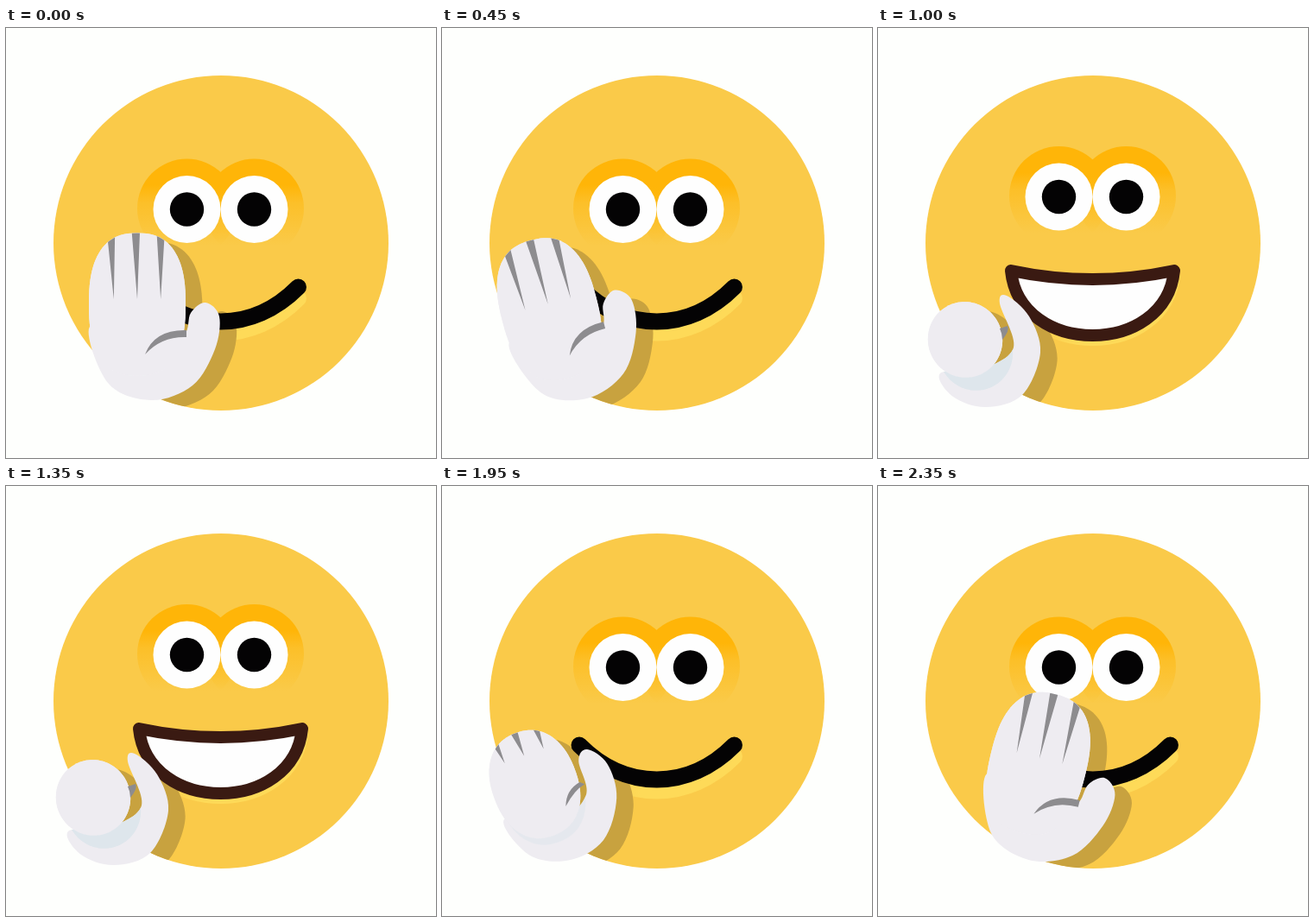
An HTML page with a canvas that plays this animation: 498x498 px, repeating every 2400 ms.

```html
<!DOCTYPE html>
<html lang="en">
<head>
<meta charset="utf-8">
<title>Giggling smiley</title>
<style>
  html, body { margin: 0; width: 100%; height: 100%; overflow: hidden; background: #fefffd; }
  canvas { display: block; width: 498px; height: 498px; }
</style>
</head>
<body>
<canvas id="stage" width="498" height="498"></canvas>
<script>
const ctx = document.getElementById('stage').getContext('2d');
const LOOP = 2400, STEP = 50;
const INK = '#040304', BROWN = '#3a1a12', WHITE = '#fefefe';
const GLOVE = '#eeecf1', CREASE = '#8d8c8f', FOLD = '#dee6ec', SHADOW = '#c8a23f';

// left x, right x, corner y, top middle, bottom middle, line width, end handle
const SMILE = [159, 338.5, 300, 340, 340, 19, 53];
const GRIN = [154, 344.5, 297, 332, 345, 14, 50];
const LAUGH = [154, 343, 281, 291, 356, 14, 10];

// Outline of palm and thumb, and the crease below the thumb: open hand, then fist.
const PALM = [
  [98, 345, 170, 378, 206, 356, 214, 330, 231, 318, 247, 334, 242, 372, 216, 414, 168, 431, 118, 411],
  [72, 400, 120, 395, 157, 370, 141, 319, 149, 310, 175, 334, 188, 376, 167, 425, 125, 439, 87, 427]
];
const THUMB = [
  [161, 378, 172, 349, 209, 350, 209, 358, 180, 357],
  [144, 361, 144, 354, 141, 348, 150, 345, 153, 350]
];

const lerp = (a, b, k) => a + (b - a) * k;
const mix = (a, b, k) => a.map((v, i) => lerp(v, b[i], k));

function ramp(t, from, to) {
  const x = Math.min(1, Math.max(0, (t - from) / (to - from)));
  return x * x * (3 - 2 * x);
}

// Turns a list of x, y pairs about the wrist.
function turn(pts, angle, shift) {
  const c = Math.cos(angle), s = Math.sin(angle);
  return pts.map((v, i) => {
    const x = pts[i - i % 2] - 160, y = pts[i - i % 2 + 1] - 430;
    return i % 2 ? 430 + x * s + y * c : 160 + shift + x * c - y * s;
  });
}

// Closed curve through all points.
function smooth(p) {
  const path = new Path2D(), n = p.length;
  const at = i => p[(i + n) % n];
  path.moveTo(p[0], p[1]);
  for (let i = 0; i < n; i += 2) {
    const out = d => at(i + d) + (at(i + 2 + d) - at(i - 2 + d)) / 6;
    const into = d => at(i + 2 + d) - (at(i + 4 + d) - at(i + d)) / 6;
    path.bezierCurveTo(out(0), out(1), into(0), into(1), at(i + 2), at(i + 3));
  }
  return path;
}

// Rounded block of radius 1; power 2 is a circle.
function block(power) {
  const path = new Path2D();
  const bend = v => Math.sign(v) * Math.abs(v) ** (2 / power);
  for (let i = 0; i < 96; i++) {
    const a = i / 48 * Math.PI;
    path.lineTo(bend(Math.cos(a)), bend(Math.sin(a)));
  }
  path.closePath();
  return path;
}

function fill(path, color) {
  ctx.fillStyle = color;
  ctx.fill(path);
}

function disc(x, y, r, color) {
  const path = new Path2D();
  path.arc(x, y, r, 0, Math.PI * 2);
  fill(path, color);
  return path;
}

function isolate(paint) {
  ctx.save();
  paint();
  ctx.restore();
}

function drawEyes() {
  const glow = ctx.createLinearGradient(0, 152, 0, 252);
  glow.addColorStop(0.3, '#ffb508');
  glow.addColorStop(0.5, 'rgba(255,181,8,.5)');
  glow.addColorStop(1, 'rgba(255,181,8,0)');
  const pair = (y, r, color) => [209.5, 287.5].forEach(x => disc(x, y, r, color));
  pair(209, 57.5, glow);
  pair(210, 39, WHITE);
  pair(210, 19.7, INK);
}

function drawMouth([left, right, y, top, bottom, width, handle], line, inside) {
  const path = new Path2D(), low = y + (bottom - y) * 4 / 3;
  path.moveTo(left, y);
  path.quadraticCurveTo((left + right) / 2, 2 * top - y, right, y);
  path.bezierCurveTo(right - handle, low, left + handle, low, left, y);
  path.closePath();
  // A bare line keeps its upper edge as the return of the lower one.
  const bare = top === bottom;
  const curve = bare ? new Path2D() : path;
  if (bare) {
    curve.moveTo(left, y);
    curve.bezierCurveTo(left + handle, low, right - handle, low, right, y);
  } else {
    fill(path, inside);
  }
  ctx.lineWidth = width;
  ctx.lineCap = ctx.lineJoin = 'round';
  ctx.strokeStyle = line;
  ctx.stroke(curve);
}

function drawMouthGlow(mouth, laugh) {
  const light = ctx.createLinearGradient(170, 0, 230, 0);
  light.addColorStop(0, 'rgba(254,218,88,0)');
  light.addColorStop(1, '#feda58');
  isolate(() => {
    ctx.translate(0, 13 - 8 * laugh);
    drawMouth(mouth, light, light);
  });
}

function poseHand(t) {
  const degrees = -22 * ramp(t, 50, 700) + 37 * ramp(t, 1900, 2320) - 15 * ramp(t, 2340, 2400);
  const curl = ramp(t, 500, 1000) - ramp(t, 1700, 2200);
  const angle = degrees * Math.PI / 180, shift = 0.5 * Math.max(0, degrees);
  const bend = ([open, fist]) => mix(turn(open, angle, shift), fist, curl);
  return {
    curl, angle,
    palm: smooth(bend(PALM)),
    thumb: bend(THUMB),
    center: bend([[152, 320], [101, 361]]),
    size: mix([56, 82.5], [43, 44], curl),
    fingers: block(lerp(2.5, 2, curl))
  };
}

// Paints in units of the finger block.
function inFingers({ center, size, angle }, paint) {
  isolate(() => {
    ctx.translate(...center);
    ctx.rotate(angle);
    ctx.scale(...size);
    paint();
  });
}

function fillHand(hand, color) {
  fill(hand.palm, color);
  inFingers(hand, () => fill(hand.fingers, color));
}

function drawFold(hand) {
  isolate(() => {
    ctx.clip(hand.palm);
    ctx.globalAlpha = hand.curl;
    ctx.translate(12 * hand.curl, 15 * hand.curl);
    inFingers(hand, () => fill(hand.fingers, FOLD));
  });
}

function drawFingerGaps(hand) {
  ctx.clip(hand.fingers);
  const gaps = new Path2D();
  for (let i = -1; i <= 1; i++) {
    const x = 0.515 * i - 0.03;
    gaps.moveTo(x - 0.085, -1.03);
    gaps.lineTo(x + 0.085, -1.03);
    gaps.lineTo(x + 0.03 * (1 - i), -1.03 + 0.96 * (1 - hand.curl));
  }
  fill(gaps, CREASE);
}

function drawHand(hand) {
  fillHand(hand, GLOVE);
  drawFold(hand);
  inFingers(hand, () => {
    fill(hand.fingers, GLOVE);
    drawFingerGaps(hand);
  });
  const p = hand.thumb, crease = new Path2D();
  crease.moveTo(p[0], p[1]);
  crease.quadraticCurveTo(p[2], p[3], p[4], p[5]);
  crease.lineTo(p[6], p[7]);
  crease.quadraticCurveTo(p[8], p[9], p[0], p[1]);
  fill(crease, CREASE);
}

function draw(t) {
  const hand = poseHand(t);
  const laugh = ramp(t, 800, 1000) - ramp(t, 1400, 1600);
  const grinning = t >= 800 && t < 1650;
  const mouth = grinning ? mix(GRIN, LAUGH, laugh) : SMILE;

  ctx.fillStyle = '#fefffd';
  ctx.fillRect(0, 0, 498, 498);
  const face = disc(249, 249, 194, '#faca49');
  isolate(() => {
    ctx.translate(0, -14.5 * laugh);
    drawEyes();
  });
  drawMouthGlow(mouth, laugh);
  isolate(() => {
    ctx.clip(face);
    ctx.translate(19.5, 10);
    fillHand(hand, SHADOW);
  });
  drawMouth(mouth, grinning ? BROWN : INK, WHITE);
  drawHand(hand);
}

const start = performance.now();
function tick() {
  const t = (performance.now() - start) % LOOP;
  draw(Math.floor(t / STEP) * STEP);
  requestAnimationFrame(tick);
}
tick();
</script>
</body>
</html>
```
